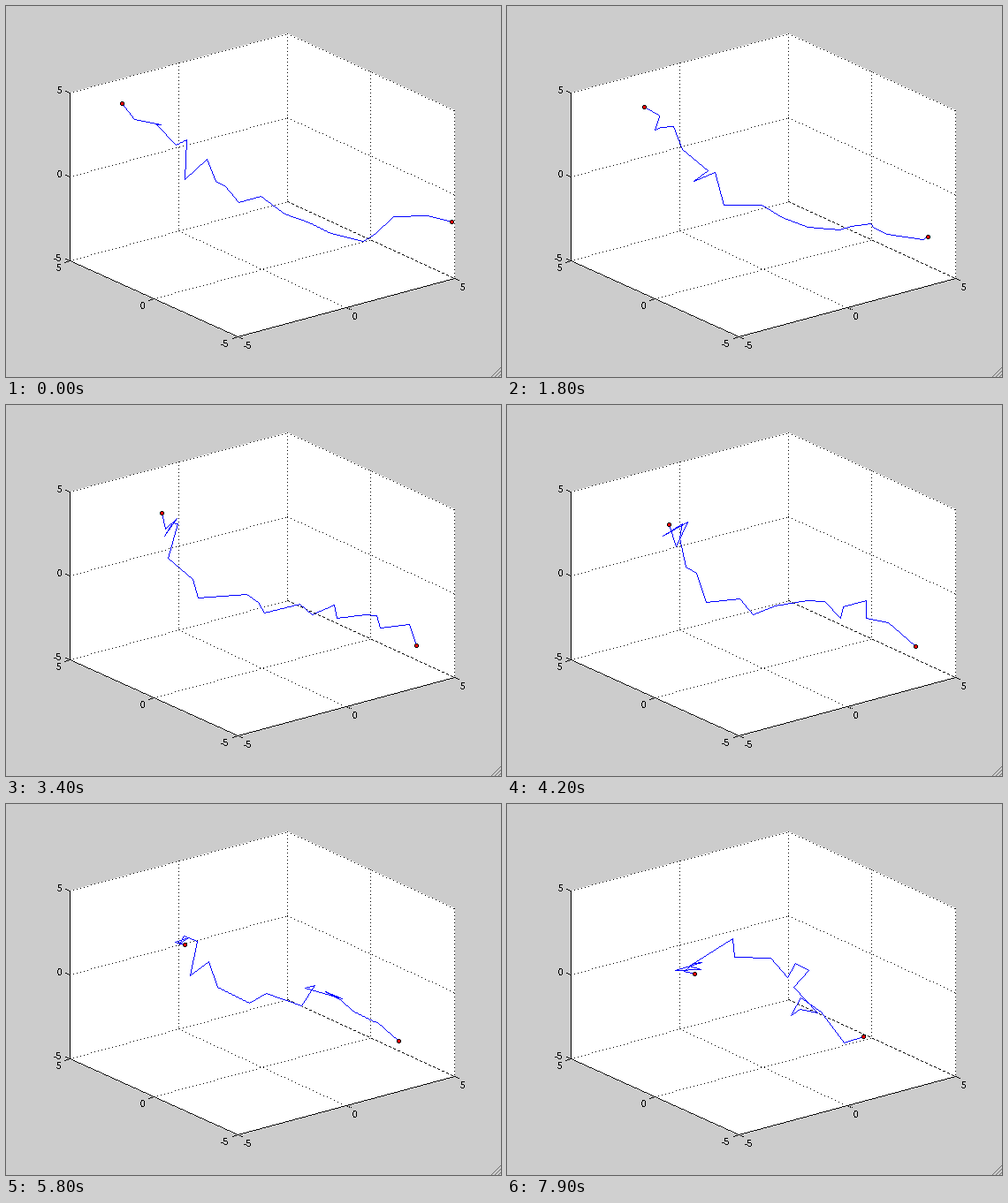
These frames come from a looping animation (560x420 px, 8000 ms). A matplotlib script:

```python
import numpy as np
import matplotlib.pyplot as plt
from matplotlib.animation import FuncAnimation

W, H, DPI = 560, 420, 80
FRAMES, STEP_MS = 80, 100
BEADS, JOINT_GAP = 21, 4

# Corners of the projected box
LEFT_TOP, LEFT, FRONT = (72, 98), (72, 288), (262, 374)
RIGHT, RIGHT_TOP = (507, 308), (507, 118)
BACK_TOP, BACK = (318, 31), (318, 221)

# Where every fourth bead drifts, at a few times in seconds
KEY_TIMES = [0, 2.4, 5, 7.9]
JOINTS = np.array([
    [(134, 115), (189, 150), (237, 203), (306, 227), (404, 267), (499, 241)],
    [(167, 107), (166, 128), (210, 202), (314, 241), (410, 249), (470, 273)],
    [(199, 154), (203, 132), (229, 224), (350, 214), (389, 215), (459, 269)],
    [(209, 189), (195, 187), (258, 172), (340, 194), (322, 239), (403, 264)],
], float)


def resample(values, old, new, axis):
    return np.apply_along_axis(lambda v: np.interp(new, old, v), axis, values)


def wander():
    """Drifting chain plus slowly changing random kinks, for all frames."""
    bead = np.arange(BEADS)
    times = np.arange(FRAMES) * STEP_MS / 1000
    path = resample(JOINTS, bead[::JOINT_GAP], bead, axis=1)
    path = resample(path, KEY_TIMES, times, axis=0)

    rng = np.random.default_rng(5)
    size = (4 + 8 * np.abs(np.sin(np.pi * bead / JOINT_GAP)))[:, None]
    keep = 0.92
    kink = rng.normal(size=(BEADS, 2))
    for pts in path:
        pts += size * kink
        kink = keep * kink + np.sqrt(1 - keep**2) * rng.normal(size=kink.shape)
    return np.rint(path)


def pixels(p, q, period=1, on=1):
    """Pixels of a line, one per step along its longer direction."""
    p, q = np.array(p, float), np.array(q, float)
    n = max(int(np.abs(q - p).max()), 1)
    k = np.arange(n + 1)
    k = k[k % period < on, None]
    return np.rint(p + (q - p) * k / n)


def mid(p, q):
    return (p[0] + q[0]) / 2, (p[1] + q[1]) / 2


fig = plt.figure(figsize=(W / DPI, H / DPI), dpi=DPI, facecolor="#cccccc")
ax = fig.add_axes([0, 0, 1, 1])
ax.set_xlim(0, W)
ax.set_ylim(H - 1, -1)
ax.axis("off")


def layer(pts, color="black", z=1):
    return ax.plot(*np.array(pts).T, ",", color=color, zorder=z)[0]


outline = [LEFT_TOP, BACK_TOP, RIGHT_TOP, RIGHT, FRONT, LEFT]
ax.fill([x + 0.5 for x, _ in outline], [y - 0.5 for _, y in outline],
        color="white", lw=0, antialiased=False, zorder=0)

for p, q in [(LEFT_TOP, BACK_TOP), (BACK_TOP, RIGHT_TOP), (BACK_TOP, BACK),
             (LEFT, BACK), (RIGHT_TOP, RIGHT),
             (mid(LEFT_TOP, BACK_TOP), mid(LEFT, BACK)),
             (mid(BACK_TOP, RIGHT_TOP), mid(BACK, RIGHT)),
             (mid(LEFT_TOP, LEFT), mid(BACK_TOP, BACK)),
             (mid(BACK_TOP, BACK), mid(RIGHT_TOP, RIGHT)),
             (mid(LEFT, BACK), mid(FRONT, RIGHT)),
             (mid(LEFT, FRONT), mid(BACK, RIGHT))]:
    layer(pixels(p, q, period=4))
layer(pixels(BACK, RIGHT, period=5, on=3))


def axis_line(p, q, tick, labels, offset, align):
    """Solid axis with a tick and a label at both ends and the middle."""
    layer(pixels(p, q))
    for (x, y), text in zip([p, mid(p, q), q], labels):
        layer(pixels((x, y), (x + tick[0], y + tick[1])))
        ax.text(x + offset[0], y + offset[1], text, ha=align, va="baseline",
                family="Liberation Sans", size=10.5 * 72 / DPI,
                antialiased=False)


axis_line(LEFT_TOP, LEFT, (-5, -2), ["5", "0", "-5"], (-9, 0), "right")
axis_line(LEFT, FRONT, (-6, 2), ["5", "0", "-5"], (-10, 11), "right")
axis_line(FRONT, RIGHT, (5, 2), ["-5", "0", "5"], (7, 13), "left")

# Resize grip in the window corner
for d in (10, 6, 2):
    layer(pixels((559 - d, 419), (559, 419 - d)), "#707070")

# Round end marker: a black disc with a red core
disc = np.array([(x, y) for x in range(-2, 3) for y in range(-2, 3)
                 if x * x + y * y < 7])
core = disc[(disc**2).sum(axis=1) < 3]

PATH = wander()
chain = layer(PATH[0], "blue", 3)
rims = layer(PATH[0], "black", 4)
cores = layer(PATH[0], "red", 5)


def stamp(tips, shape):
    return (tips[:, None] + shape).reshape(-1, 2)


def draw(i):
    pts = PATH[i]
    trace = np.concatenate([pixels(p, q) for p, q in zip(pts, pts[1:])])
    tips = pts[[0, -1]]
    # The box limit cuts off whatever leaves it on the right
    trace, tips = (a[a[:, 0] <= RIGHT[0]] for a in (trace, tips))
    chain.set_data(*trace.T)
    rims.set_data(*stamp(tips, disc).T)
    cores.set_data(*stamp(tips, core).T)
    return chain, rims, cores


anim = FuncAnimation(fig, draw, frames=FRAMES, interval=STEP_MS,
                     repeat=True, repeat_delay=0, blit=False)
plt.show()
```
